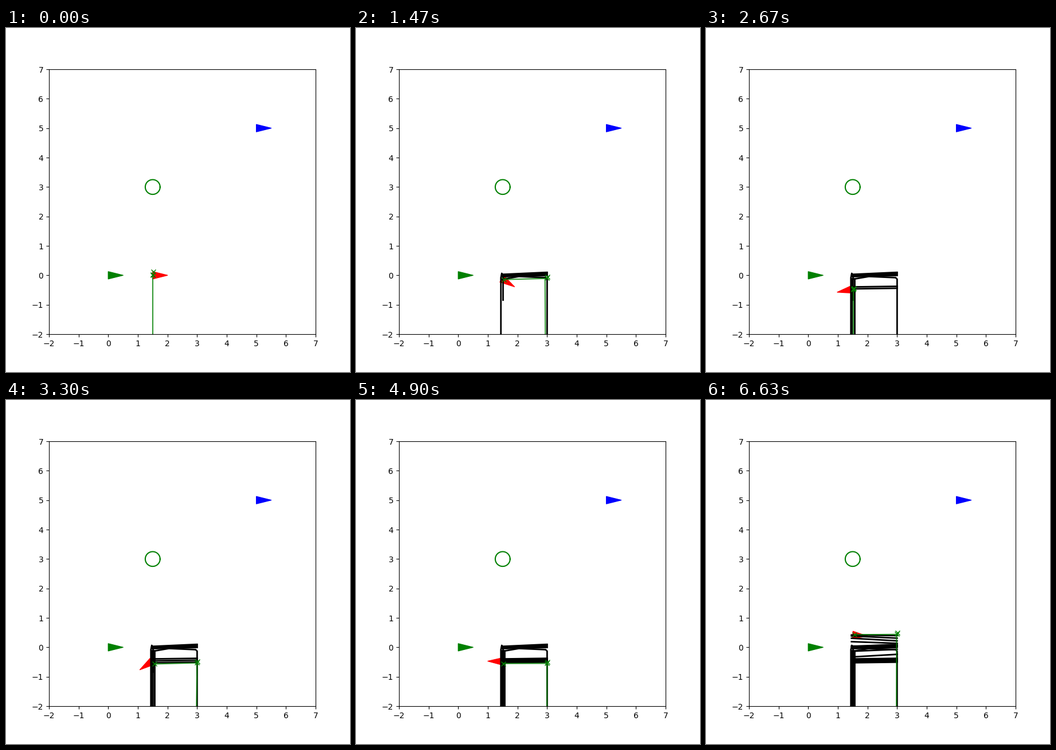
These frames come from a looping animation (600x600 px, 6.66 s). A matplotlib script:

```python
import numpy as np
import matplotlib.pyplot as plt
from matplotlib.animation import FuncAnimation
from matplotlib.patches import Polygon

FRAMES, INTERVAL = 200, 33.3
LEFT, RIGHT = 1.5, 3
FLOOR, SKY = -2.5, 7.5

fig, ax = plt.subplots(figsize=(6, 6), dpi=100)
ax.set(xlim=(-2, 7), ylim=(-2, 7), xticks=range(-2, 8), yticks=range(-2, 8))


def arrow(x, y, deg):
    """Corners of a pointer whose base is centred on (x, y)."""
    a = np.radians(deg)
    ahead = np.array([np.cos(a), np.sin(a)])
    side = np.array([-ahead[1], ahead[0]])
    base = np.array([x, y])
    return np.array([base + 0.125 * side, base + 0.5 * ahead,
                     base - 0.125 * side])


def add_arrow(x, y, color):
    return ax.add_patch(Polygon(arrow(x, y, 0), color=color, lw=1,
                                joinstyle="round"))


def sunk(i):
    """0 to 1 while the robot backs down."""
    t = np.clip((i - 36) / 24, 0, 1)
    return t * t * (3 - 2 * t)


def risen(i):
    """0 to 1 while the robot climbs at the end."""
    return np.sin(np.pi / 2 * np.clip((i - 171) / 28, 0, 1))


def height(i):
    return -0.48 * sunk(i) + 0.9 * risen(i)


def heading(i):
    return np.interp(i, [0, 44, 60, 128, 199], [0, 1048, 1587, 2960, 4675])


def map_walls():
    """Yield (first frame, points) for every wall put on the map."""
    yield 5, [(LEFT, 0.03), (LEFT, -0.84)]
    yield 14, [(1.44, FLOOR), (1.44, -0.08), (1.47, 0.06)]
    yield 36, [(1.47, -0.14), (2.05, -0.04), (2.95, -0.08),
               (RIGHT, -0.13), (RIGHT, FLOOR)]
    for k in range(4):
        yield 8 + 7 * k, [(1.47, 0.03 - 0.025 * k),
                          (RIGHT, 0.1 - 0.035 * k)]
    for k in range(7):
        y = -0.395 - 0.065 * k % 0.15 if k == 0 else -0.395 - (0.065 * k) % 0.15
        yield 66 + 13 * k, [(LEFT, y), (RIGHT, y + 0.02)]
    for k in range(6):
        x = 1.51 + 0.045 * (-1) ** k * (1 - k / 8)
        yield 64 + 11 * k, [(x, FLOOR), (x, -0.12)]
    for k in range(7):
        start = 174 + 4 * k
        y = height(start)
        yield start, [(1.46, y), (RIGHT, y + 0.09 * np.cos(0.75 * k))]


def scan(i):
    """Wall seen by the sensor, and the corner points found on it."""
    rng = np.random.default_rng(i)
    jx, jy, kx, ky, foot = rng.normal(0, 0.015, 5)
    y, down = height(i), sunk(i)
    if i % 8 < 3:
        x = LEFT + jx
        top = SKY if i > 190 else y
        return ([(x, top), (x, FLOOR)],
                [(x, y), (x, y + 0.02), (x + 0.02, y + 0.13 - 0.1 * down)])
    drop = 0.08 * down * (1 - risen(i))
    a = (LEFT + 0.055 * down + jx, y - drop + jy)
    b = (RIGHT - 0.1 * (1 - down) + kx, y - drop + 0.02 + ky)
    if rng.random() < 0.06:
        b = (b[0] + 0.3, b[1])
    return ([a, b, (b[0] + foot, FLOOR)],
            [a, (RIGHT, b[1] + 0.01), (RIGHT + 0.02, b[1] + 0.05)])


add_arrow(0, 0, "green")
add_arrow(5, 5, "blue")
robot = add_arrow(LEFT, 0, "red")
turn = np.linspace(0, 2 * np.pi, 100)
ax.plot(1.5 + 0.25 * np.cos(turn), 3 + 0.25 * np.sin(turn), color="green")
trail = [(start, ax.plot(*zip(*pts), color="black", lw=2)[0])
         for start, pts in map_walls()]
beam, = ax.plot([], [], color="green", alpha=0.8)
hits, = ax.plot([], [], "x", color="green")


def draw(i):
    lost = 123 <= i < 126 or 165 <= i < 171
    for artist in (robot, beam, hits):
        artist.set_visible(not lost)
    drift = 0.03 * np.sin(np.pi * min(i / 128, 1))
    robot.set_xy(arrow(LEFT - drift, height(i), heading(i)))
    line, corners = scan(i)
    beam.set_data(*zip(*line))
    hits.set_data(*zip(*corners))
    for start, wall in trail:
        wall.set_visible(i >= start)
    return [robot, beam, hits] + [wall for _, wall in trail]


anim = FuncAnimation(fig, draw, frames=FRAMES, interval=INTERVAL,
                     repeat=True, repeat_delay=0)
plt.show()
```
